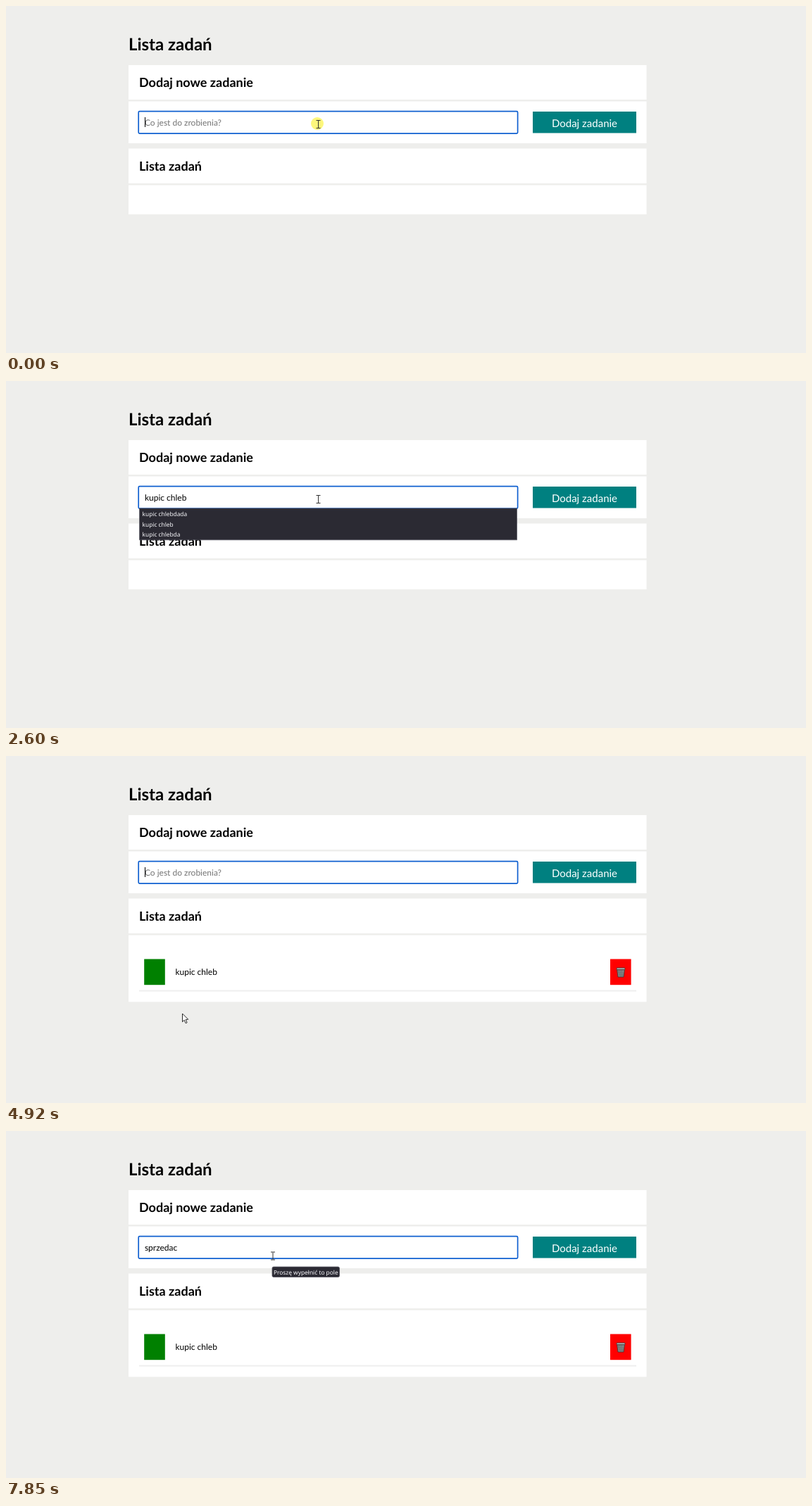
These frames come from a looping animation (1136 px wide and 493 px high, 8000 ms). An HTML page with a canvas:

```html
<!DOCTYPE html>
<html lang="pl">
<head>
<meta charset="utf-8">
<title>Lista zadań</title>
<style>
html, body { margin: 0; width: 100%; height: 100%; overflow: hidden; background: #eeeeec; }
canvas { display: block; }
</style>
</head>
<body>
<canvas id="stage" width="1136" height="493"></canvas>
<script>
const ctx = document.getElementById('stage').getContext('2d');
const LOOP = 8000;
const LATO = 'Lato, sans-serif';
const UI = '"Noto Sans", "Open Sans", sans-serif';
const BG = '#eeeeec';
const DARK = '#2b2a33';

const BREAD = ['kupic chlebdada', 'kupic chleb', 'kupic chlebda'];
const ALL = [...BREAD, 'sadas', 'sdsd', 'dada'];
const S_ROWS = ['sadas', 'sdsd', 'sada', 'sdas', 'ss'];
const NONE = [];

// time, typed text, caret visible, suggestions
const INPUT = [
  [0, '', 1, NONE], [30, '', 1, ALL], [500, '', 0, ALL],
  [960, 'k', 1, ALL], [1030, 'k', 0, BREAD], [1130, 'ku', 1, BREAD],
  [1330, 'kup', 1, BREAD], [1490, 'kupi', 1, BREAD], [1580, 'kupic', 1, BREAD],
  [1660, 'kupic ', 1, BREAD], [1800, 'kupic c', 1, BREAD], [1930, 'kupic ch', 1, BREAD],
  [2070, 'kupic chl', 1, BREAD], [2200, 'kupic chle', 1, BREAD],
  [2370, 'kupic chleb', 1, BREAD], [2600, 'kupic chleb', 0, BREAD],
  [2900, '', 1, NONE], [3160, '', 0, NONE], [3700, '', 1, NONE],
  [4220, '', 0, NONE], [4720, '', 1, NONE], [5240, '', 0, NONE],
  [5750, '', 1, NONE], [6270, '', 0, NONE],
  [6310, 's', 1, NONE], [6380, 's', 1, S_ROWS], [6580, 'sp', 1, S_ROWS],
  [6650, 'sp', 1, NONE], [6720, 'spr', 1, NONE], [6800, 'sprz', 1, NONE],
  [6880, 'sprze', 1, NONE], [7020, 'sprzed', 1, NONE], [7180, 'sprzeda', 1, NONE],
  [7320, 'sprzedac', 1, NONE], [7850, 'sprzedac', 0, NONE]
];

// time, x, y of the pointer
const PATH = [
  [0, 443.5, 168], [3420, 443.5, 168], [3450, 430, 95], [3480, 413, 9], [3510, 400, -40],
  [3810, 364, -40], [3840, 361, 49], [3870, 359, 117], [3900, 356, 170], [3930, 352, 210],
  [4020, 328, 262], [4110, 295, 304], [4200, 268, 331], [4260, 260, 338],
  [4440, 260, 338], [4560, 256, 355], [4710, 250, 369], [4890, 250, 369], [4920, 250, 365.5],
  [5070, 274, 318], [5220, 322, 246], [5370, 368, 190], [5490, 379, 177.5], [LOOP, 379, 177.5]
];

function rect(x, y, w, h, color) {
  ctx.fillStyle = color;
  ctx.fillRect(x, y, w, h);
}

function text(str, x, y, size, { color = '#000', font = LATO, weight = 400, align = 'left' } = {}) {
  ctx.font = `${weight} ${size}px ${font}`;
  ctx.textAlign = align;
  ctx.fillStyle = color;
  ctx.fillText(str, x, y);
}

function box(x, y, w, h, r, fill, stroke, line) {
  ctx.beginPath();
  ctx.roundRect(x, y, w, h, r);
  ctx.fillStyle = fill;
  ctx.fill();
  ctx.strokeStyle = stroke;
  ctx.lineWidth = line;
  ctx.stroke();
}

function polygon(points) {
  ctx.beginPath();
  points.forEach(([x, y]) => ctx.lineTo(x, y));
  ctx.closePath();
}

function drawPage(hasTask) {
  rect(0, 0, 1136, 493, BG);
  text('Lista zadań', 174, 63, 24, { weight: 700 });
  const panel = (y, bottom) => rect(174, y, 735.5, bottom - y, '#fff');
  panel(84, 133);
  panel(135.5, 195);
  panel(202.5, 252);
  panel(254.5, hasTask ? 349.3 : 296);
  text('Dodaj nowe zadanie', 189, 115, 18, { weight: 700 });
  text('Lista zadań', 189, 234, 18, { weight: 700 });
  rect(748, 150, 147, 30.5, '#008080');
  text('Dodaj zadanie', 821.5, 171.5, 15, { color: '#fff', align: 'center' });
  if (hasTask) drawTask();
}

function drawTask() {
  rect(196.2, 288.5, 29.6, 36.7, '#008000');
  text('kupic chleb', 240.4, 311, 12);
  rect(858, 288.5, 29.6, 36.7, '#f00');
  rect(189, 332.6, 706, 2, '#eee');
  drawBin(873, 301);
}

function drawBin(x, y) {
  polygon([[x - 5.5, y + 1.5], [x + 5.5, y + 1.5], [x + 4, y + 13], [x - 4, y + 13]]);
  ctx.fillStyle = '#8b8b8b';
  ctx.fill();
  ctx.strokeStyle = '#3c3030';
  ctx.lineWidth = 0.8;
  ctx.stroke();
  ctx.beginPath();
  for (let i = -1; i <= 1; i++) {
    ctx.moveTo(x + i * 2.5 - 1.5, y + 3);
    ctx.lineTo(x + i * 1.8 + 1.2, y + 12.5);
    ctx.moveTo(x - 4.5, y + 7 + i * 3);
    ctx.lineTo(x + 4.5, y + 7 + i * 3);
  }
  ctx.strokeStyle = '#5a5a5a';
  ctx.lineWidth = 0.5;
  ctx.stroke();
  box(x - 6, y, 12, 2.5, 1, '#b5b5b5', '#3c3030', 0.8);
}

function drawField(value, caret) {
  box(188.2, 149.7, 538.4, 31.4, 1.5, '#fff', '#1060d0', 1.7);
  const start = 196.9;
  text(value || 'Co jest do zrobienia?', start, 170, 12, { color: value ? '#000' : '#757575' });
  if (caret) {
    const x = Math.max(197, Math.floor(start + (value ? ctx.measureText(value).width : 0)));
    rect(x, 158, 1, 14, '#000');
  }
}

function drawSuggestions(rows) {
  if (!rows.length) return;
  const step = 14.7;
  box(189.5, 181, 536, rows.length * step + 0.7, 0, DARK, '#52525e', 0.7);
  rows.forEach((row, i) => text(row, 193.6, 192 + i * step, 8.3, { color: '#fbfbfe', font: UI }));
}

function drawTooltip() {
  box(378, 193, 95.5, 14.5, 2, DARK, '#55545f', 0.8);
  text('Proszę wypełnić to pole', 425.8, 203.7, 8.35, { color: '#fbfbfe', font: UI, align: 'center' });
}

function drawBeam(x, y) {
  ctx.strokeStyle = '#333';
  ctx.lineWidth = 1;
  ctx.beginPath();
  ctx.moveTo(x, y - 5);
  ctx.lineTo(x, y + 5);
  for (const side of [-1, 1]) {
    ctx.moveTo(x - 3, y + side * 5.5);
    ctx.lineTo(x + 3, y + side * 5.5);
  }
  ctx.stroke();
}

function drawArrow(x, y) {
  const shape = [[0.5, 0.5], [0.5, 12.2], [3.2, 9.7], [5.2, 14.2], [7.1, 13.3], [5.2, 9], [8.7, 8.7]];
  polygon(shape.map(([dx, dy]) => [x + dx, y + dy]));
  ctx.fillStyle = '#fff';
  ctx.fill();
  ctx.strokeStyle = '#111';
  ctx.lineWidth = 0.9;
  ctx.stroke();
}

function pointerAt(time) {
  const t = Math.floor(time / 30) * 30;
  const i = PATH.findIndex(key => key[0] > t);
  const [t0, x0, y0] = PATH[i - 1];
  const [t1, x1, y1] = PATH[i];
  const k = (t - t0) / (t1 - t0);
  return [x0 + (x1 - x0) * k, y0 + (y1 - y0) * k];
}

function drawPointer(t) {
  const [x, y] = pointerAt(t);
  if (t < 60) {
    ctx.beginPath();
    ctx.arc(442, 167, 9, 0, Math.PI * 2);
    ctx.fillStyle = t < 30 ? '#fdf77c' : 'rgba(253,247,124,.4)';
    ctx.fill();
  }
  const overField = x > 188 && x < 727 && y > 149 && y < 182;
  (overField ? drawBeam : drawArrow)(x, y);
}

function render(t) {
  const [, value, caret, rows] = INPUT.findLast(entry => entry[0] <= t);
  ctx.textRendering = 'geometricPrecision';
  drawPage(t >= 2900);
  drawField(value, caret);
  drawSuggestions(rows);
  if (t >= 5980) drawTooltip();
  drawPointer(t);
}

const begin = performance.now();
function tick() {
  render((performance.now() - begin) % LOOP);
  requestAnimationFrame(tick);
}
tick();
</script>
</body>
</html>
```
